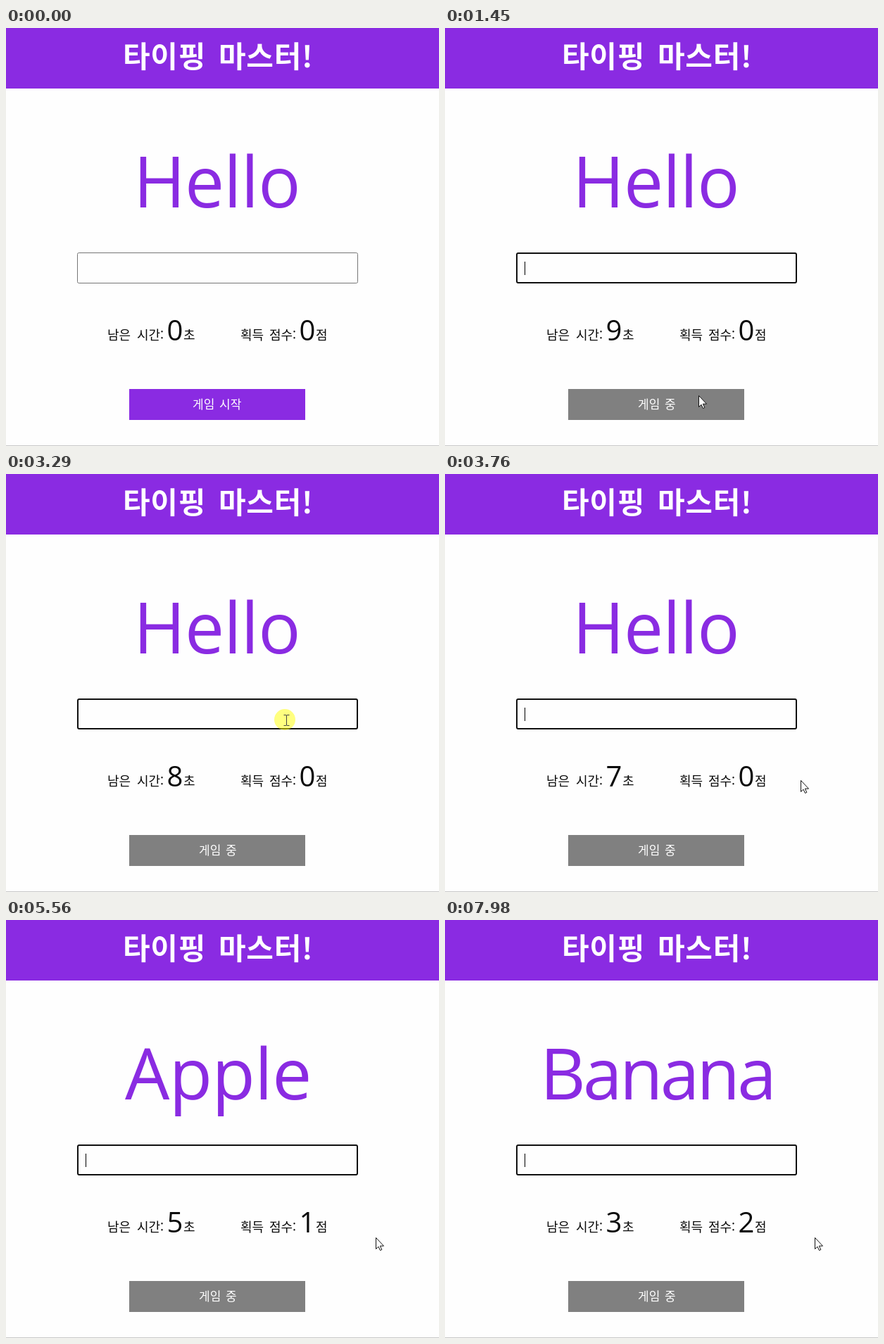
Animation of 615 by 594 pixels, one loop 8 s. Source, as an HTML page with a canvas:

```html
<!DOCTYPE html>
<html lang="ko">
<head>
<meta charset="utf-8">
<title>Typing game</title>
<style>
  html, body { margin: 0; width: 100%; height: 100%; overflow: hidden; background: #fefefe; }
  canvas { display: block; }
</style>
</head>
<body>
<canvas id="stage" width="615" height="594"></canvas>
<script>
const ctx = document.getElementById('stage').getContext('2d');
const LOOP = 8000, STEP = 70;
const PURPLE = '#8a2be2', PAPER = '#fefefe', INK = '#0a0a0a';
const KOREAN = '"Noto Sans CJK KR", "Noto Sans CJK JP", sans-serif';
const LATIN = '"Open Sans", "Noto Sans", sans-serif';
const FIELD = '16px "Liberation Sans", Arial, sans-serif';

// Hard changes: [start time, value]
const WORDS = [
  [0, { text: 'Hello', x: 190, gap: '-0.8px' }],
  [5560, { text: 'Apple', x: 169, gap: '-0.5px' }],
  [7980, { text: 'Banana', x: 144, gap: '-3.7px' }]
];
const SECONDS = [[0, 0], [1450, 9], [2500, 8], [3490, 7], [4490, 6], [5490, 5], [6510, 4], [7510, 3]];
const SCORE = [[0, 0], [5560, 1], [7980, 2]];
const TYPED = [
  [0, ''], [4560, 'h'], [4760, 'he'], [5090, 'hel'], [5220, 'hell'], [5560, ''],
  [6850, 'a'], [7180, 'ap'], [7250, 'app'], [7580, 'appl'], [7980, '']
];
const CARET = [
  [0, false], [1450, true], [1980, false], [2520, true], [3020, false],
  [3560, true], [4160, false], [4560, true], [6090, false], [6580, true]
];

// Pointer moves: start, end, from, to
const MOVES = [
  [500, 850, [448, 580], [356, 533]],
  [1450, 1450, [360, 522], [360, 522]],
  [1980, 2190, [380, 516], [485, 459]],
  [2520, 3080, [470, 422], [398, 350]],
  [3490, 3840, [398, 350], [525, 451]]
];
const CLICKS = [[1250, 1450, 356, 533], [3290, 3490, 396, 349]];

const at = (track, t) => track.filter(([start]) => start <= t).pop()[1];

function write(text, x, y, font, color, gap = '0px') {
  ctx.font = font;
  ctx.fillStyle = color;
  ctx.letterSpacing = gap;
  ctx.textAlign = 'left';
  ctx.fillText(text, x + ctx.measureText(text).actualBoundingBoxLeft, y);
  ctx.letterSpacing = '0px';
}

function digit(value, x) {
  ctx.font = '40px ' + LATIN;
  ctx.fillStyle = INK;
  ctx.textAlign = 'center';
  ctx.fillText(value, x, 444);
}

function box(x, y, w, h, color) {
  ctx.fillStyle = color;
  ctx.fillRect(x, y, w, h);
}

function drawHeader() {
  const font = 'bold 42px ' + KOREAN;
  box(0, 0, 615, 86, PURPLE);
  write('타이핑', 169, 56, font, '#fff', '0.7px');
  write('마스터!', 304, 56, font, '#fff', '0.7px');
}

function drawField(t) {
  const focused = t >= 1450, line = focused ? 2 : 1;
  ctx.lineWidth = line;
  ctx.strokeStyle = focused ? '#101010' : '#767676';
  ctx.beginPath();
  ctx.roundRect(101 + line / 2, 319 + line / 2, 399 - line, 44 - line, 2);
  ctx.stroke();

  const text = at(TYPED, t);
  ctx.font = FIELD;
  ctx.textAlign = 'left';
  ctx.fillStyle = INK;
  ctx.fillText(text, 112.5, 346);
  if (at(CARET, t)) {
    box(Math.round(113 + ctx.measureText(text).width), text ? 331 : 332, 1, 19, '#000');
  }
}

function drawStatus(t) {
  const label = (text, x) => write(text, x, 443, '300 18px ' + KOREAN, INK);
  label('남은', 145);
  label('시간:', 186);
  digit(at(SECONDS, t), 240);
  label('초', 252);
  label('획득', 333);
  label('점수:', 374);
  digit(at(SCORE, t), 428);
  label('점', 440);
}

function drawButton(t) {
  const playing = t >= 1450;
  const caption = (text, x) => write(text, x, 541, '17px ' + KOREAN, '#fff');
  box(175, 513, 250, 44, playing ? '#808080' : PURPLE);
  caption('게임', playing ? 274 : 265);
  caption(playing ? '중' : '시작', playing ? 312 : 303);
}

function outline(path) {
  ctx.fillStyle = '#fff';
  ctx.strokeStyle = '#111';
  ctx.lineWidth = 1;
  ctx.lineJoin = 'round';
  ctx.fill(path);
  ctx.stroke(path);
}

const ARROW = new Path2D('M.5 .5V16.5L4 13.2L6.5 18.5L8.8 17.5L6.4 12.2H11.5Z');
const HAND = new Path2D('M-1.5 14V2Q-1.5 .5 0 .5T1.5 2V7.5Q4 5.8 5 8.2Q7.2 7 8.2 9.2Q11 8.2 11 11V16Q11 18 9 20V22.5H0V20L-5 13.5Q-6 11 -4 10.8Q-3 10.8 -1.5 13Z');
const CREASES = new Path2D('M1.5 7V12M5 8.5V12M8.2 9.5V12');
const BEAM = new Path2D('M-3.5 -7.5H-1L0.5 -7L2 -7.5H4.5M.5 -7V7M-3.5 7.5H-1L.5 7L2 7.5H4.5');

function drawPointer(t) {
  const move = MOVES.filter(([start]) => start <= t).pop();
  if (!move) return;
  const [start, end, from, to] = move;
  const elapsed = Math.floor((t - start) / STEP + 1e-6) * STEP;
  const p = end > start ? Math.min(1, elapsed / (end - start)) : 1;
  const ease = 1 - (1 - p) ** 2;
  const [x, y] = from.map((v, i) => Math.round(v + (to[i] - v) * ease));
  const inside = (l, top, r, b) => x >= l && x < r && y >= top && y < b;

  ctx.save();
  ctx.translate(x, y);
  if (inside(101, 319, 500, 363)) {
    ctx.strokeStyle = '#444';
    ctx.lineWidth = 1;
    ctx.stroke(BEAM);
  } else if (t < 1450 && inside(175, 513, 425, 557)) {
    outline(HAND);
    ctx.stroke(CREASES);
  } else {
    outline(ARROW);
  }
  ctx.restore();
}

function drawClick(t) {
  for (const [start, end, x, y] of CLICKS) {
    if (t < start || t >= end) continue;
    ctx.fillStyle = 'rgba(255, 255, 0, 0.5)';
    ctx.beginPath();
    ctx.arc(x, y, 15, 0, Math.PI * 2);
    ctx.fill();
  }
}

function draw(t) {
  box(0, 0, 615, 594, PAPER);
  drawHeader();
  const word = at(WORDS, t);
  write(word.text, word.x, 255, '100px ' + LATIN, PURPLE, word.gap);
  drawField(t);
  drawStatus(t);
  drawButton(t);
  box(0, 593, 615, 1, '#c8c8c8');
  drawClick(t);
  drawPointer(t);
}

const began = performance.now();
function tick() {
  draw((performance.now() - began) % LOOP);
  requestAnimationFrame(tick);
}
tick();
</script>
</body>
</html>
```
